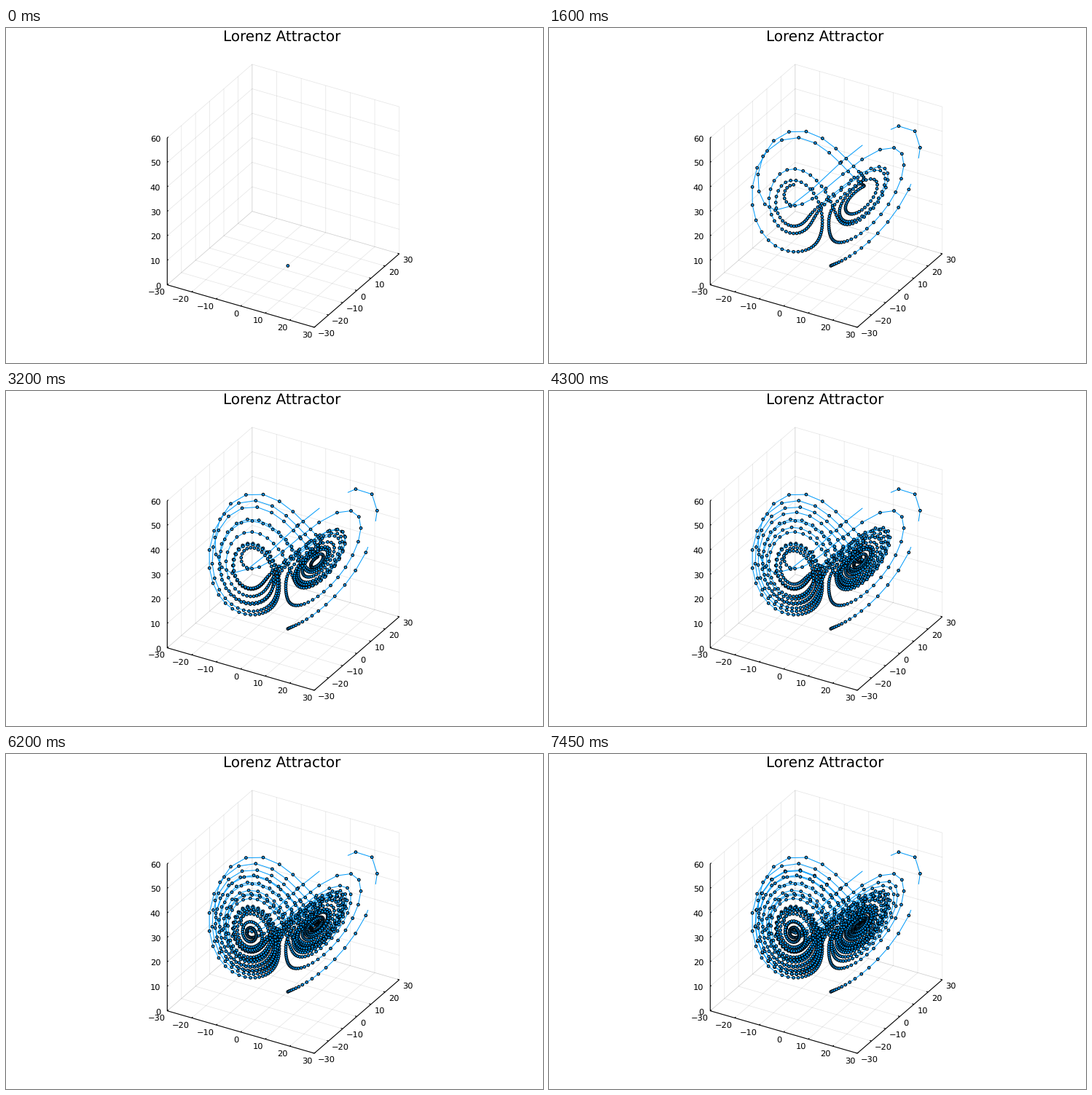
A matplotlib script that plays this animation: 737x460 px, repeating every 7.5 s.

```python
import numpy as np
import matplotlib.pyplot as plt
from matplotlib.animation import FuncAnimation
from matplotlib.collections import LineCollection

W, H = 737, 460
DPI = 64
PX = 72 / DPI                     # points per pixel
FRAMES, INTERVAL, PER_FRAME = 150, 50, 10
BLUE = "#009AFA"
LO, HI = np.array([-30, -30, 0]), np.array([30, 30, 60])

plt.rcParams["font.family"] = "DejaVu Sans"
plt.rcParams["text.hinting"] = "none"


def lorenz(n, dt=0.02, sigma=10, rho=28, beta=8 / 3):
    """Forward Euler path from (1, 1, 1), without the starting point."""
    x = y = z = 1.0
    path = []
    for _ in range(n):
        dx = sigma * (y - x)
        dy = x * (rho - z) - y
        dz = x * y - beta * z
        x += dt * dx
        y += dt * dy
        z += dt * dz
        path.append((x, y, z))
    return np.array(path)


def project(p):
    """Orthographic view, azimuth and elevation 30 degrees, in pixels."""
    x, y, z = np.moveaxis(np.asarray(p, float), -1, 0)
    s, c, k = 0.5, np.sqrt(3) / 2, 3.885
    px = 380.5 + k * (c * x + s * y)
    py = 230.4 + k * (s * s * x - s * c * y - c * (z - 30))
    return np.stack([px, py], -1)


def clip_segments(p):
    """Consecutive segments of the path, cut at the faces of the box."""
    a, d = p[:-1], np.diff(p, axis=0)
    t1, t2 = (LO - a) / d, (HI - a) / d
    start = np.clip(np.minimum(t1, t2).max(1), 0, 1)[:, None]
    stop = np.clip(np.maximum(t1, t2).min(1), 0, 1)[:, None]
    stop = np.maximum(start, stop)
    return np.stack([a + start * d, a + stop * d], 1)


fig = plt.figure(figsize=(W / DPI, H / DPI), dpi=DPI, facecolor="white")
ax = fig.add_axes([0, 0, 1, 1])
ax.set_xlim(0, W)
ax.set_ylim(H, 0)
ax.axis("off")


def lines(paths, width, z, **kw):
    segs = [project(p) for p in paths]
    ax.add_collection(LineCollection(segs, linewidths=width * PX, zorder=z, **kw),
                      autolim=False)


def label(pos, dx, dy, v, ha):
    ax.text(pos[0] + dx, pos[1] + dy + 4.2, str(v).replace("-", "\u2212"),
            size=11.43 * PX, ha=ha, va="baseline", zorder=4)


# grid on the floor and the two back walls
xy_ticks, z_ticks = range(-30, 31, 10), range(0, 61, 10)
grid = [[(v, -30, 0), (v, 30, 0), (v, 30, 60)] for v in xy_ticks]
grid += [[(30, v, 0), (-30, v, 0), (-30, v, 60)] for v in xy_ticks]
grid += [[(-30, -30, v), (-30, 30, v), (30, 30, v)] for v in z_ticks]
lines(grid, 0.75, 1, colors="black", alpha=0.1)

# axes with short inward ticks
T = 0.72
axes = [[(-30, -30, 60), (-30, -30, 0), (30, -30, 0), (30, 30, 0)]]
ticks = [[(v, -30, 0), (v, -30 + T, 0)] for v in xy_ticks]
ticks += [[(30, v, 0), (30 - T, v, 0)] for v in xy_ticks]
ticks += [[(-30, -30, v), (-30, -30 + T, v)] for v in z_ticks]
lines(axes + ticks, 1.1, 2, colors="black")

for v in xy_ticks:
    label(project((v, -30, 0)), -2.8, 9.4, v, "right")
    label(project((30, v, 0)), 4.5, 7.7, v, "left")
for v in z_ticks:
    label(project((-30, -30, v)), -9.1, 0.6, v, "right")

ax.text(378.8, 17.5, "Lorenz Attractor", size=20 * PX,
        ha="center", va="baseline", zorder=4)

path = lorenz(FRAMES * PER_FRAME)
segments = project(clip_segments(path))
inside = ((path >= LO) & (path <= HI)).all(1)
points = project(path)

trail = LineCollection([], colors=BLUE, linewidths=1.0 * PX, zorder=5)
ax.add_collection(trail, autolim=False)
dots = ax.scatter([], [], s=(3.7 * PX) ** 2, facecolor=BLUE,
                  edgecolor="black", zorder=6)
dots.set_linewidth([1.0 * PX] * 2)     # two widths keep sub-pixel placement


def draw(i):
    n = PER_FRAME * i + 1
    trail.set_segments(segments[:n - 1])
    dots.set_offsets(points[:n][inside[:n]])
    return trail, dots


anim = FuncAnimation(fig, draw, frames=FRAMES, interval=INTERVAL,
                     init_func=lambda: draw(0), repeat=True, repeat_delay=0)
plt.show()
```
